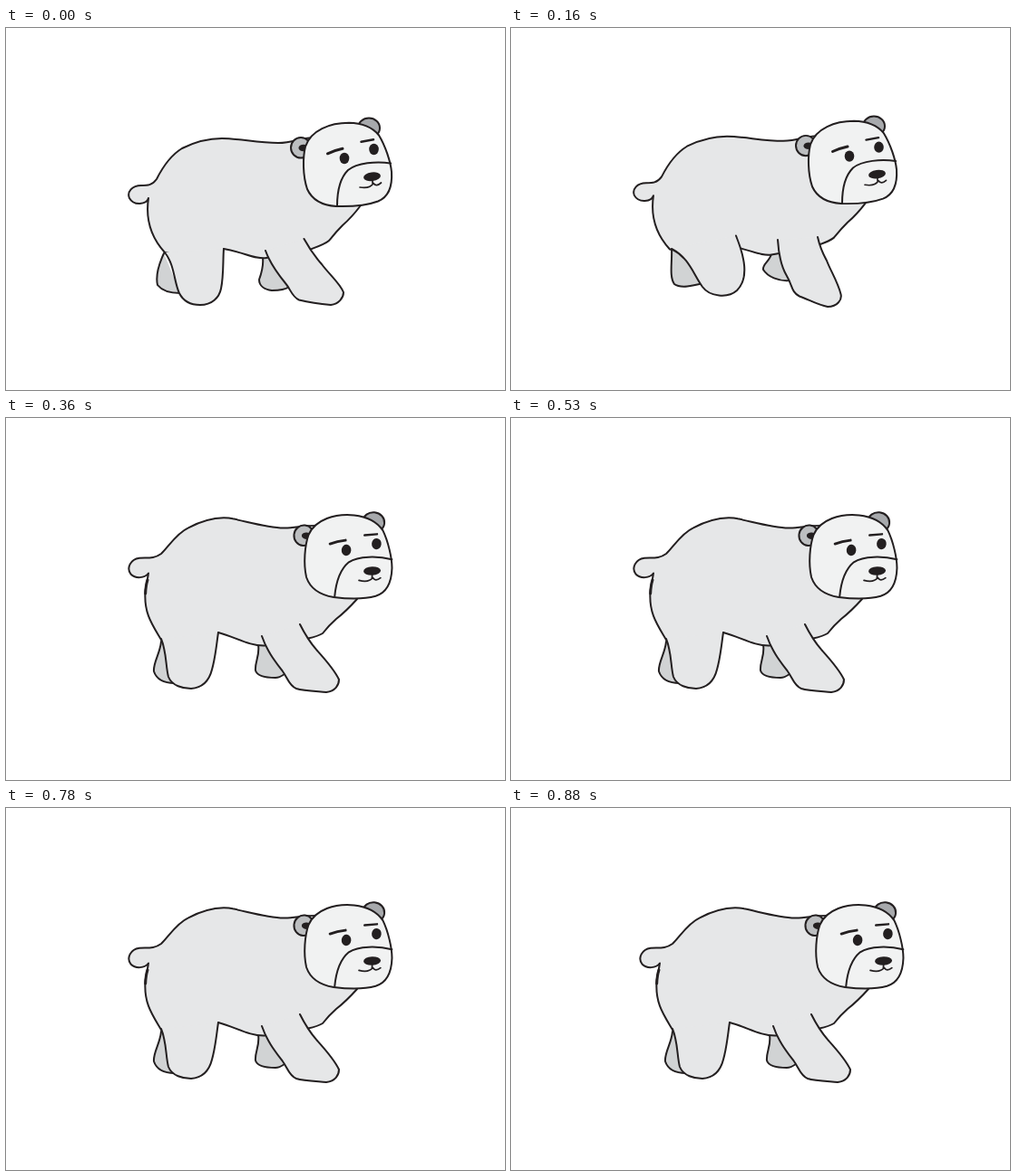
An HTML page for the animation above (0.92 s loop, 550 by 400 pixels).

```html
<!DOCTYPE html>
<html>
<head>
<meta charset="utf-8">
<title>Walking bear</title>
<style>
html, body { margin: 0; height: 100%; overflow: hidden; background: #fff; }
svg { display: block; width: 100%; height: 100%; }
path, ellipse { stroke: #231f20; stroke-width: 2; stroke-linecap: round; stroke-linejoin: round; }
.far { fill: #d1d3d4; }
.near { fill: #e6e7e8; }
.face { fill: #f1f2f2; }
.ear { fill: #a7a9ac; }
.pale { fill: #bcbec0; }
.ink { fill: #231f20; stroke: none; }
.line { fill: none; }
.brow { fill: none; stroke-width: 3; }
</style>
</head>
<body>
<svg viewBox="0 0 550 400">
  <g id="bear">
    <path id="farHind" class="far"/>
    <path id="farFront" class="far"/>
    <path id="body" class="near"/>
    <path id="hind" class="near"/>
    <path id="front" class="near"/>
    <path id="rump" class="brow"/>
    <g id="head">
      <ellipse class="ear" cx="400" cy="110.5" rx="12" ry="11"/>
      <ellipse class="pale" cx="325" cy="132.3" rx="11" ry="11.3"/>
      <ellipse class="ink" cx="328" cy="132.5" rx="5.5" ry="3.8"/>
      <path class="face" d="M378 104.8C392 105 404 110 411 118.5C418 130 424 148 425 159C426 175 421 187 410 191.5C398 196 382 197.5 364 197C348 196 337 189 332 178C327 163 327 143 330 131C336 113 357 104.8 378 104.8Z"/>
      <path class="line" d="M365 196.500C365 180 369 165 377 157C387 149 408 147 424 149.5"/>
      <path class="brow" d="M354.5 138.8Q362 135.3 371 133.3"/>
      <path class="brow" style="stroke-width:2.5" d="M391.5 125.8L405 123.3"/>
      <ellipse class="ink" cx="373" cy="144" rx="5.3" ry="6.2"/>
      <ellipse class="ink" cx="405.5" cy="134" rx="5.3" ry="6.2"/>
      <ellipse class="ink" cx="403.5" cy="164.2" rx="9.5" ry="4.8" transform="rotate(-8 403.5 164.2)"/>
      <path class="line" style="stroke-width:1.7" d="M404 167V172M390 176Q401 178 405 171.5Q408 176 413.5 171"/>
    </g>
  </g>
</svg>
<script>
const squash = 'matrix(1 0 0 .989 0 -.8)';
const standing = 'M215 256L175 248C157 228 154 208 157 188C155 195 141 197 136 188C133 181 139 174 149 174C156 174 161 174 166 167C173 153 181 141 194 133C210 125 225 122 238 122C257 122 277 127 300 127C317 127 325 121 341 121L391 196C385 204 379 211 371 218C363 226 360 230 356 235C351 239 345 241 337 244L310 250L287 254C275 256 263 248 240 244';

const stride = {
  body: standing,
  bodyMove: '',
  headMove: '',
  rump: '',
  farHind: 'M174 249C168 262 165 275 167 284C171 289 180 293 192 293',
  farFront: 'M283 254C284 263 282 270 279 278C279 285 285 289 293 290C302 290 308 289 312 286L311 254',
  hind: 'M175 248C186 262 185 280 191 293C196 303 205 306 214 306C227 306 235 298 237 288C240 274 239 258 240 244',
  front: 'M286 246C291 260 299 271 308 282C314 289 315 297 323 300.5C333 303 346 305 358 306C367 305 372 298 372 292C368 282 356 272 348 261C339 251 334 243 328.5 233'
};

const gather = {
  body: standing,
  bodyMove: squash,
  headMove: squash,
  rump: '',
  farHind: 'M177 243C178 258 174 274 180 283C187 288 200 285 212 282L205 255',
  farFront: 'M287 250C284 259 277 261 278 267C283 275 295 280 307 279L300 250',
  hind: 'M177 244C196 254 200 270 211 286C219 297 239 299 249 290C263 276 257 252 248 229.5',
  front: 'M294 234C295 250 298 264 304 274C310 284 309 292 318 296.5C328 300 338 306 349 308C360 308 365 300 363.5 294C360 280 352 268 348 257C343 248 340 240 338 231'
};

const low = {
  body: 'M215 250L171 245C161 228 152 216 153.5 192C154 185 156 179 157 171.5C153 177 143 178 137.5 172.5C132.5 166 137 156 147 154.7C155 154 163 156 171 150C179 142.5 187.5 127.5 201 121.3C214 114.5 228 110.5 240 110.3C244 110.3 247 110.5 250 111.3C268 115 288 121 306 121.6C318 122 330 118 345 119L387 200C379 209 373 215 364 222C356 229 352 234 349 238C344 241 340 242 333 243.5L285 251.5C268 252 254 242.5 234 237',
  bodyMove: '',
  headMove: 'translate(2.5 3.5) rotate(5.4 389 139)',
  rump: 'M156 179Q154 185 153.7 194',
  farHind: 'M171 247C170 260 162 270 163 280C166 289 175 293 186 293',
  farFront: 'M278 251C280 262 274 270 275 279C277 286 288 287 297 287C301 287 304 285 307 283L306 251',
  hind: 'M171 244C177 258 176 275 179 286C183 296 195 299 204 299C217 298 224 290 227 278C231 264 232 250 234 237',
  front: 'M282 241C288 258 296 268 305 280C310 286.5 312 296 320 299C328 301.5 343 302 353 303C363 302 367 295 367 289C362 278 352 267 343 257C334 247 329 238 324 228'
};

// Pose, end time in ms, sideways step
const steps = [[stride, 160, 0], [gather, 360, 0], [low, 880, 0], [low, 920, 7]];
const part = id => document.getElementById(id);
let shown;

function draw() {
  const time = performance.now() % 920;
  const step = steps.find(s => time < s[1]);
  if (step !== shown) {
    const [pose, , x] = shown = step;
    for (const id of ['farHind', 'farFront', 'body', 'hind', 'front', 'rump'])
      part(id).setAttribute('d', pose[id]);
    part('body').setAttribute('transform', pose.bodyMove);
    part('head').setAttribute('transform', pose.headMove);
    part('bear').setAttribute('transform', `translate(${x})`);
  }
  requestAnimationFrame(draw);
}
draw();
</script>
</body>
</html>
```
